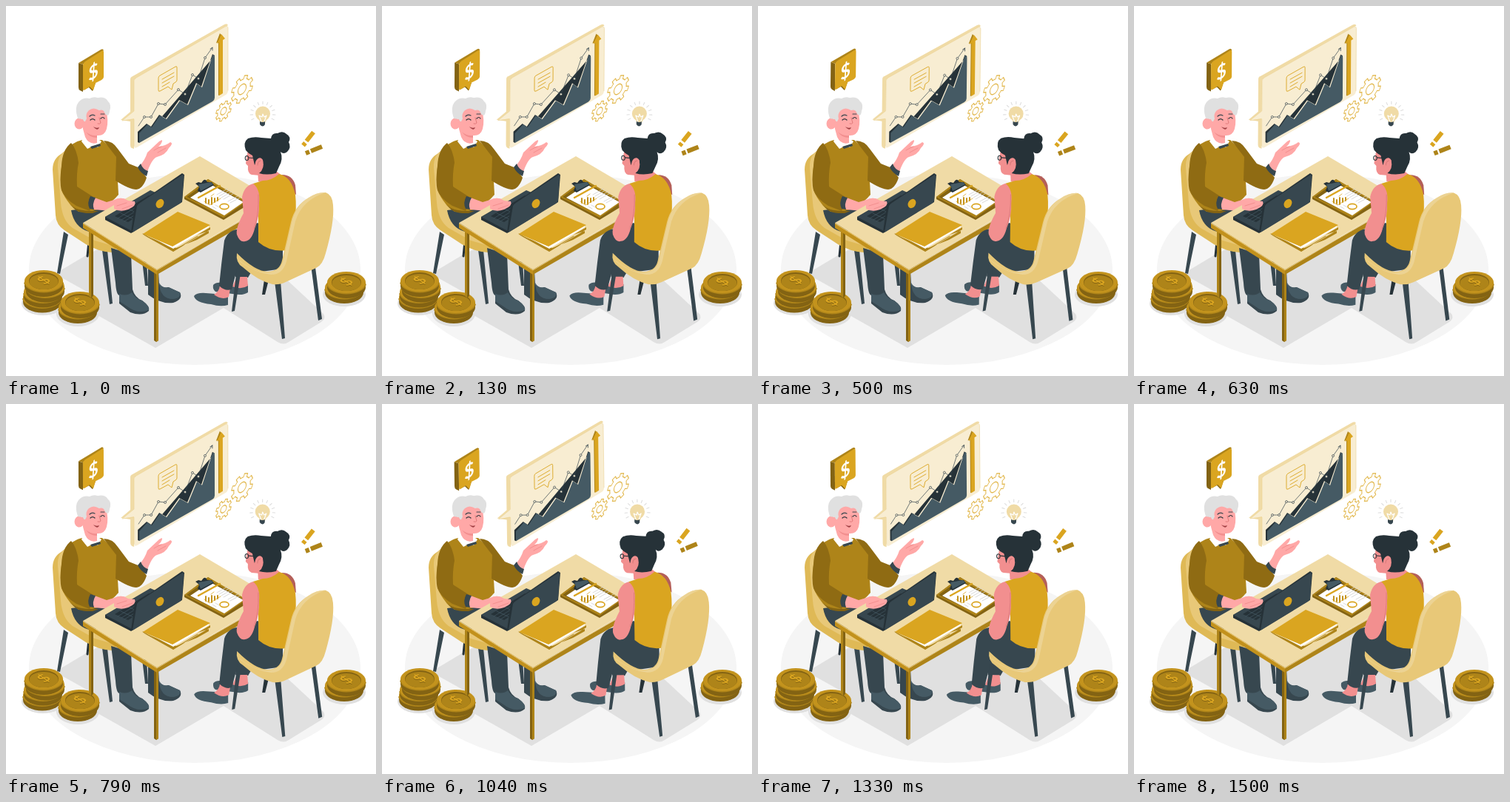
An HTML page that plays this animation: 500x500 px, repeating every 1540 ms.

```html
<!DOCTYPE html>
<html lang="en">
<head>
<meta charset="utf-8">
<title>Business consultation</title>
<style>
html, body { margin: 0; width: 100%; height: 100%; overflow: hidden; background: #fff; }
svg { display: block; width: 100%; height: 100%; }
text { font-family: Lato, sans-serif; font-weight: 700; text-anchor: middle; }
.gold { fill: #daa520; } .ochre { fill: #ae8419; } .brown { fill: #836313; } .sleeve { fill: #8f6b13; }
.sand { fill: #e8c878; } .cream { fill: #f0dba6; } .pale { fill: #f8edd2; }
.navy { fill: #37474f; } .ink { fill: #263238; } .slate { fill: #455a64; }
.skin { fill: #ffa8a7; } .rose { fill: #f28f8f; }
.grey { fill: #e0e0e0; } .white { fill: #fff; }
.line { fill: none; stroke-linecap: round; stroke-linejoin: round; }
</style>
</head>
<body>
<svg viewBox="0 0 500 500">
<defs>
  <g id="coin">
    <path class="brown" d="M-26 0V7A26 14.500 0 0 0 26 7V0Z"/>
    <path class="line" stroke="#ae8419" stroke-width="2.500" d="M-25.500 3A26 14.500 0 0 0 25.500 3"/>
    <ellipse rx="26" ry="14.500" fill="#c3931d"/>
    <ellipse rx="20" ry="11.500" class="brown"/>
    <ellipse cy="1" rx="19.500" ry="10.500" class="ochre"/>
    <text font-size="20" transform="matrix(.866 -.5 .866 .5 0 0)" y="7" fill="#836313">$</text>
    <text font-size="20" transform="matrix(.866 -.5 .866 .5 0 -1)" y="7" fill="#daa520">$</text>
  </g>
</defs>

<!-- Floor and shadows -->
<ellipse cx="255" cy="356" rx="224" ry="129" fill="#f5f5f5"/>
<path class="grey" d="M66 362L108 337L180 300L262 320L297 305L345 338L429 416Q433 422 426 427L382 454Q375 459 367 454L294 408L202 462L108 409L120 392Z"/>
<g class="grey">
  <ellipse cx="50" cy="402" rx="29" ry="16"/><ellipse cx="97" cy="416" rx="29" ry="17"/>
  <ellipse cx="457" cy="390" rx="29" ry="16"/>
</g>
<g>
  <use href="#coin" x="49" y="393"/><use href="#coin" x="50" y="386"/>
  <use href="#coin" x="53" y="379"/><use href="#coin" x="51" y="371.500"/>
  <use href="#coin" x="97" y="407.500"/><use href="#coin" x="100" y="400.500"/>
  <use href="#coin" x="457" y="380.500"/><use href="#coin" x="460" y="373.500"/>
</g>

<!-- Man: chair, legs, body -->
<path class="navy" d="M78 305L84 309L73 362L69 361ZM130 330H137L144 402L140 403ZM184 345H190L192 378H188Z"/>
<path class="line" stroke="#263238" stroke-width="3" d="M112 318L110 338"/>
<path fill="#dfb956" d="M76 199Q63 206 63 221L67 283Q68 296 79 303L108 322Q125 332 143 333L160 318L100 250L90 190Z"/>
<path class="sand" d="M85 193Q69 199 70 219L74 266Q76 290 90 300L120 317L148 325L156 310L110 230Z"/>
<path class="navy" d="M192 350L206 357L207 376Q210 382 219 380L235 387Q240 396 226 401Q208 403 192 390Z"/>
<path class="slate" d="M207 374Q211 382 220 380L235 387Q238 394 226 396Q208 396 207 374Z"/>
<path class="navy" d="M142 327L169 335L171 383Q174 394 184 398Q195 406 193 412Q184 420 168 414L153 402V391Q149 390 148 374Z"/>
<path class="slate" d="M153 389Q163 393 170 387Q175 396 184 398Q195 406 193 411Q178 417 164 406L153 399Z"/>
<path class="navy" d="M88 276L153 268L166 300L112 305Q92 299 88 276Z"/>
<path class="ochre" d="M103 181Q88 184 81 197Q71 220 75 248Q77 256 88 270L98 278Q130 281 152 255L149 199L130 181Z"/>
<path class="sleeve" d="M132 182Q144 182 151 193L166 213L181 219L190 232Q185 247 176 248Q167 248 148 236L149 204Z"/>
<path class="sleeve" d="M88 185Q76 194 75 216Q72 238 75 249Q79 260 95 270L113 277L121 260L96 244Q95 226 98 212Q96 194 88 185Z"/>
<path class="brown" d="M88 268Q92 278 125 277L117 280Q93 281 88 268Z"/>
<path class="skin" d="M117 258Q112 270 119 275L141 277Q153 279 161 277Q174 276 175 269Q174 264 164 263Q156 257 146 262L136 265Z"/>
<path class="line" stroke="#f28f8f" d="M148 270Q157 269 164 264M157 274L171 269"/>
<path class="skin" d="M180 217Q188 208 191 198L207 183Q214 178 209 187L206 190Q216 189 222 184Q227 185 220 192Q216 201 204 204Q197 206 190 227Q184 225 180 217Z"/>
<path class="line" stroke="#f28f8f" d="M200 195Q205 192 210 190M205 198L216 192"/>
<path class="navy" d="M182 213Q185 221 192 223L190 230Q182 226 178 218ZM114 257L121 259Q116 268 119 275L113 274Q109 266 114 257Z"/>
<path class="white" d="M105 177L102 183L110 193L118 189L124 191L129 183L123 179Z"/>
<path class="navy" d="M114 190L127 186L128 189L116 193Z"/>
<ellipse class="skin" cx="99" cy="159" rx="6.500" ry="7.500"/>
<path class="skin" d="M102 143Q118 133 135 140Q139 155 136 166Q133 176 123 175V185Q112 188 107 177L104 166Z"/>
<path class="rose" d="M108 170Q114 176 123 175V178Q113 178 108 170Z"/>
<path class="grey" d="M97 152Q92 137 98 130Q104 123 113 125Q118 122 124 124Q134 122 138 129Q143 133 140 142Q139 151 134 146Q132 139 126 141Q118 136 112 141Q107 146 109 152Q106 160 104 153Z"/>
<path class="line" stroke="#263238" stroke-width="1.200" d="M114 154Q117 151 120 154M128 152Q131 149 133 152"/>
<path class="line" stroke="#37474f" stroke-width="1.200" d="M113 149Q116 146 120 148M128 146L133 146"/>
<path class="line" stroke="#e07b7b" d="M126 151L128 158Q127 160 124 159"/>
<path fill="#9f3f43" d="M118 163Q122 166 126 164Q124 170 118 163Z"/>

<!-- Table -->
<path class="brown" d="M112 304H118V392L115 394L112 392ZM200 356H206V452L203 454L200 452Z"/>
<path class="ochre" d="M112 304H115V394L112 392ZM203 356H206V452L203 454Z"/>
<path fill="#c2911c" d="M104 293V300L204 363V356Z"/>
<path class="ochre" d="M204 356V363L362 272V265Z"/>
<path class="cream" d="M104 293L262 203L362 262L204 356Z"/>
<path class="line" stroke="#e8c878" d="M104.500 294L204 357L362 263"/>
<g id="laptop">
  <path class="ink" d="M134 285V289L169 307L215 279L195 250Z"/>
  <path class="navy" d="M134 285L195 249L232 265L170 304Z"/>
  <path class="ink" d="M147 284L193 256L211 263L165 292Z"/>
  <path class="line" stroke="#455a64" stroke-width=".7" d="M151 287L197 259M156 289L202 261M160 291L206 263M155 280L172 288M165 274L182 282"/>
  <path class="ink" d="M169 305L174 270L238 226L241 228L238 265Z"/>
  <path class="navy" d="M171 306L177 270Q178 268 181 266L237 229Q241 226 240 231L238 262Q238 265 235 267Z"/>
  <ellipse class="gold" cx="208" cy="267" rx="5" ry="6.500" transform="rotate(32 208 267)"/>
</g>
<path class="skin" d="M146 264Q155 256 165 263L174 264Q177 270 165 275Q154 279 146 274Z"/>
<path class="line" stroke="#f28f8f" d="M150 270L163 266M157 274L171 269"/>
<path class="ochre" d="M185 309L226 332L276 302V299L259 309L274 304V307L258 316L230 327Z"/>
<path class="white" d="M188 308L226 328L274 299V296Z"/>
<path class="gold" d="M185 308L232 278L276 296L225 325Z"/>
<path class="line" stroke="#ae8419" d="M185 308L226 331L259 311"/>
<path class="brown" d="M241 258V261L294 289L325 270V266L273 234Z"/>
<path class="ochre" d="M241 258L273 234L325 264L294 286Z"/>
<path class="brown" d="M244 258L273 237L321 264L294 282Z"/>
<path class="white" d="M249 259L276 241L321 265L295 283Z"/>
<path class="ink" d="M256 240L260 238L264 239Q269 231 272 238L278 238L281 242L263 252L259 250L261 244Z"/>
<path class="slate" d="M260 241L277 238L280 241L263 250Z"/>
<path class="line" stroke="#daa520" stroke-width="2.500" stroke-linecap="butt" d="M260 259L289 243"/>
<path class="line" stroke="#c3931d" stroke-width="2" stroke-linecap="butt" d="M270 266V260M274 267V262M278 268V259M282 265V260M286 263V259"/>
<path class="line" stroke="#daa520" stroke-width=".8" d="M268 264L275 269L290 260M277 257L281 254"/>
<path class="line" stroke="#cfcfcf" stroke-width=".8" d="M285 255L299 247M288 257L302 249M291 259L305 251M294 261L308 253M300 264L313 257M303 266L316 259M279 271L284 274M283 269L288 272"/>
<ellipse cx="295" cy="271" rx="6" ry="3.600" fill="none" stroke="#daa520" stroke-width="1.700"/>

<!-- Gears, paths set by script -->
<g class="line" stroke="#e2b84e" stroke-width="1.200">
  <path id="gearBig" transform="matrix(.866 -.5 0 1 319 112.500)"/>
  <path id="gearSmall" transform="matrix(.866 -.5 0 1 294 142)"/>
</g>

<!-- Board and price bubble -->
<g id="talk">
  <path class="brown" d="M98 77L104 79V116L100 114Q98 113 98 110Z"/>
  <path class="ochre" d="M98 77L128 59Q131 57 132 60L104 79Z"/>
  <path class="brown" d="M104 114L112 110L117 115L121 104L112 104Z"/>
  <path class="gold" d="M104 80Q104 77 107 75L129 61Q132 59 132 62V96Q132 98 129 100L121 104L118 114L113 109L107 113Q104 115 104 112Z"/>
  <text class="white" font-size="27" transform="matrix(.866 -.5 0 1 118 89)" y="9.500">$</text>
  <path class="cream" d="M168 99Q168 96 171 95L295 25Q299 23 300 26L173 100V193L170 192Q168 191 168 188V156L155 154L168 143Z"/>
  <path class="pale" d="M173 102Q173 99 176 97L296 28Q300 26 300 30V114Q300 118 297 120L177 191Q173 193 173 189V152L157 155L173 142Z"/>
  <path class="line" stroke="#ecd394" stroke-width=".6" d="M173 189V153L157 155L173 142V102Q173 99 176 97L296 28Q300 26 300 30V114"/>
  <path class="ink" d="M178 184V170L190 159L196 163L207 147L216 152L234 127L245 133L257 104L264 109L279 65L282 67L180 185Z"/>
  <path class="slate" d="M180 185V172L191 160L197 164L208 148L217 153L235 128L246 134L258 105L265 110L279 67Q282 64 282 70V124Q282 127 279 129Z"/>
  <path id="trend" class="line" stroke="#37474f" stroke-width=".7"/>
  <g id="dots" class="pale" stroke="#37474f" stroke-width=".7"></g>
  <path class="line" stroke="#37474f" stroke-width=".8" d="M276 58L279 56V60"/>
  <path class="ochre" d="M287 121V49L284 50L289 37L291 39V119Z"/>
  <path class="gold" d="M288 121V49L285 51L291 38L296 44L293 46V118Z"/>
  <g class="line" stroke="#daa520" stroke-width=".9">
    <path d="M206 97Q206 95 208 94L229 82Q231 81 231 83V100Q231 102 229 103L226 105L224 113L219 109L208 115Q206 116 206 114Z"/>
    <path d="M211 99L227 90M211 104L227 95M211 109L221 103"/>
  </g>
</g>

<!-- Woman, chair, idea marks -->
<g id="client">
  <path class="ink" d="M349 370H355L350 390H346Z"/>
  <path class="navy" d="M412 350L418 353L427 423L422 425Z"/>
  <path class="navy" d="M310 330L340 345L327 367L310 366Z"/>
  <path class="slate" d="M280 377Q285 372 295 375L312 378L327 376V387Q320 392 306 389L283 386Q279 383 280 377Z"/>
  <path class="rose" d="M312 366L326 366L327 378Q318 384 306 379Z"/>
  <path class="slate" d="M254 392Q258 387 270 388L283 389Q289 396 300 393L300 404Q290 407 277 403Q256 401 254 392Z"/>
  <path class="rose" d="M289 378L303 382L301 393Q292 398 281 390Q288 386 289 378Z"/>
  <path class="navy" d="M340 293L317 301Q300 302 295 317Q291 348 288 378Q296 386 305 383L314 349L345 359L374 355V320Z"/>
  <path fill="#b45f59" d="M373 228Q387 228 391 242L392 255L378 245Z"/>
  <path class="rose" d="M340 220L365 223L374 230L360 240L341 237Z"/>
  <path class="gold" d="M334 240L347 236Q359 236 369 227Q386 231 391 255Q395 290 379 330Q357 333 341 319L341 283Z"/>
  <path class="rose" d="M334 240Q322 243 319 258L321 280Q310 300 312 309Q316 320 323 318Q332 317 336 301Q343 284 342 266Q344 248 334 240Z"/>
  <path class="line" stroke="#d87979" stroke-width=".8" d="M341 255Q342 283 335 301"/>
  <path class="rose" d="M327 195Q325 204 324 213L327 216Q326 226 332 228L344 229L352 207L340 191Z"/>
  <path class="line" stroke="#263238" stroke-width="1.200" d="M338 206L328 205"/>
  <ellipse cx="325.500" cy="205.500" rx="2.300" ry="3" fill="none" stroke="#263238"/>
  <path class="ink" d="M324 195Q320 184 327 179Q335 176 345 178L358 179Q359 171 367 172Q374 168 379 173Q386 177 382 184Q386 191 380 197Q375 201 371 197Q375 207 369 217L365 226Q352 229 342 226Q350 220 347 208Q342 203 339 209L336 215L333 202Q328 200 324 195Z"/>
  <ellipse class="rose" cx="342" cy="212" rx="5" ry="7" transform="rotate(20 342 212)"/>
  <path class="line" stroke="#d87979" d="M340 215Q340 210 344 209"/>
  <path class="navy" d="M313 346L319 349L309 412L305 413ZM363 372L371 371L377 449L373 450Z"/>
  <path class="sand" d="M312 334Q310 347 320 353Q340 371 360 376Q370 377 378 373L419 354Q428 350 432 334Q444 292 442 269Q441 255 432 252Q421 251 409 259Q390 270 385 292L373 344Q370 358 354 359Q337 359 312 334Z"/>
  <path class="cream" d="M312 334Q310 341 317 345Q338 361 354 360Q370 359 374 346L386 293Q391 270 409 259Q421 251 432 252Q400 262 391 291L379 345Q374 363 358 363Q338 361 317 346Q310 341 312 334Z" opacity=".6"/>
  <circle class="cream" cx="347" cy="145.500" r="10"/>
  <path class="cream" d="M341 152L344 158H350L353 152Z"/>
  <path class="line" stroke="#fff" stroke-width="1.200" d="M345 156L342 148L346 150L347 146L349 150L352 148L349 156"/>
  <path class="navy" d="M343 156Q347 158 350 156V160Q347 165 343 160Z"/>
  <path id="rays" class="line" stroke="#dedede" stroke-width="1.100"/>
  <g stroke-width="6">
    <path stroke="#daa520" d="M406 182.500L415.500 170.500M401.500 188.500L404.500 185"/>
    <path stroke="#ae8419" d="M412 196L427 190M405 199L410 197"/>
  </g>
</g>
</svg>
<script>
const $ = id => document.getElementById(id);
const polar = (r, a, x = 0, y = 0) => `${x + r * Math.cos(a)} ${y + r * Math.sin(a)}`;

function gear(id, r) {
  const teeth = 8, step = 2 * Math.PI / teeth;
  let d = '';
  for (let i = .5; i < teeth; i++) {
    [[.76, -.5], [.76, -.27], [1, -.2], [1, .2], [.76, .27]].forEach(([k, a]) => {
      d += (d ? 'L' : 'M') + polar(r * k, (i + a) * step);
    });
  }
  const hole = r * .38;
  $(id).setAttribute('d', `${d}ZM${hole} 0A${hole} ${hole} 0 1 0 ${-hole} 0A${hole} ${hole} 0 1 0 ${hole} 0`);
}
gear('gearBig', 17);
gear('gearSmall', 12.3);

const trend = [[179, 162], [187, 150], [196, 150], [206, 132], [215, 133], [233, 113],
  [242, 119], [252, 93], [260, 98], [269, 70], [279, 56]];
$('trend').setAttribute('d', 'M' + trend.join('L'));
$('dots').innerHTML = trend.slice(1, -1)
  .map(([x, y]) => `<circle cx="${x}" cy="${y}" r="1.500"/>`).join('');

let rays = '';
for (let i = 0; i < 11; i++) {
  const a = Math.PI * (.85 + i * .13);
  rays += `M${polar(13.5, a, 347, 146)}L${polar(17, a, 347, 146)}`;
}
$('rays').setAttribute('d', rays);

const LOOP = 1540, SWING = 1500;
const sway = p => p < .25 ? 4 * p : p < .75 ? 2 - 4 * p : 4 * p - 4;

function draw() {
  const angle = sway(Math.min(1, performance.now() % LOOP / SWING));
  $('talk').setAttribute('transform', `rotate(${angle} 199 108)`);
  $('client').setAttribute('transform', `rotate(${angle} 347 289)`);
  requestAnimationFrame(draw);
}
draw();
</script>
</body>
</html>
```
